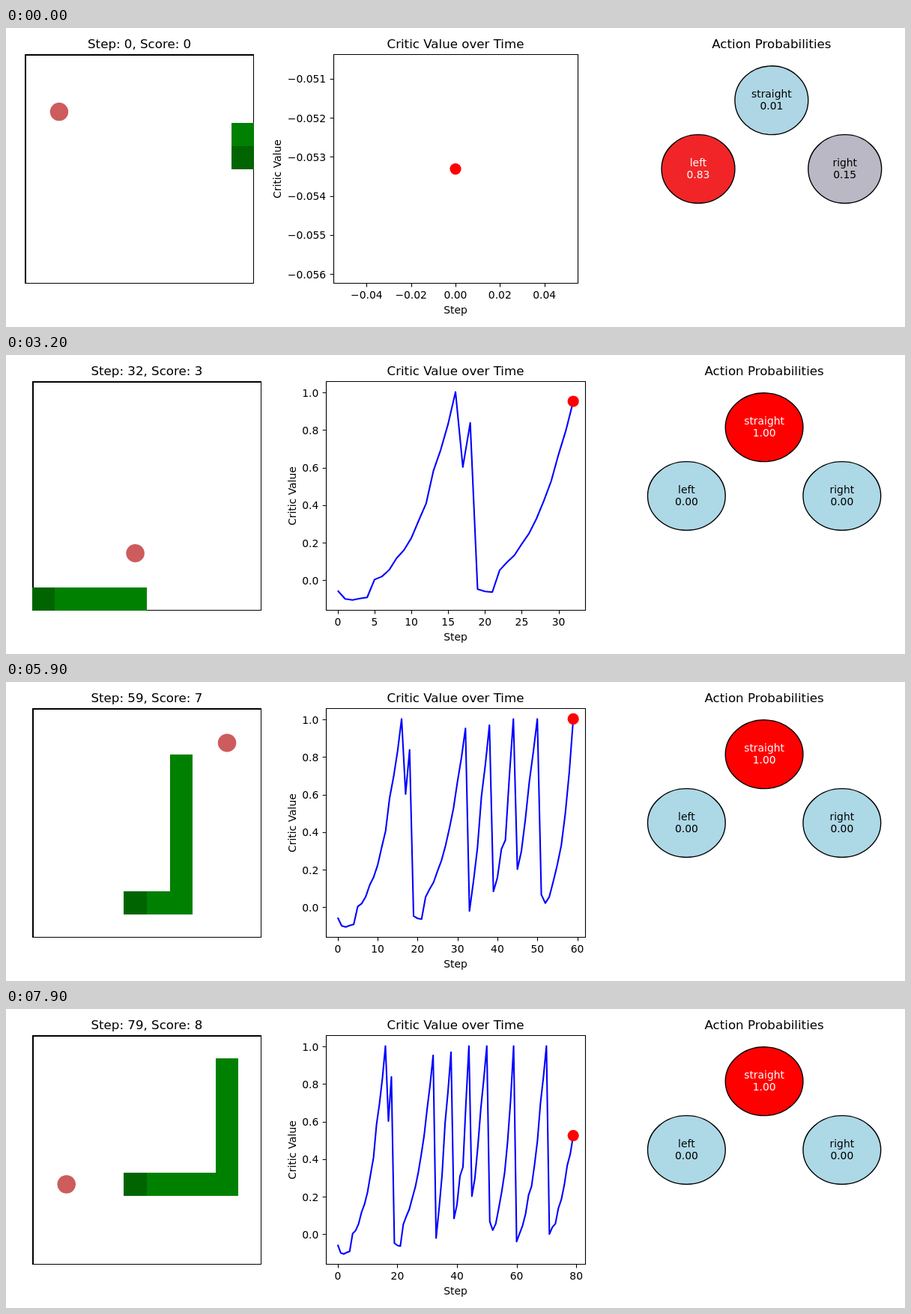
An HTML page for the animation above (8000 ms loop, 1200 px wide and 400 px high).

```html
<!DOCTYPE html>
<html lang="en">
<head>
<meta charset="utf-8">
<title>Snake agent</title>
<style>
  html, body { margin: 0; width: 100%; height: 100%; overflow: hidden; background: #fff; }
  svg { display: block; width: 1200px; height: 400px; font: 13.89px "DejaVu Sans", sans-serif; }
  .title { font-size: 16.67px; }
</style>
</head>
<body>
<svg id="stage" viewBox="0 0 1200 400"></svg>
<script>
const STEP_MS = 100, STEPS = 80, FONT = 13.89;
const TOP = 35.5, SIZE = 306.2, BOTTOM = TOP + SIZE, CELL = SIZE / 10;
const stage = document.getElementById('stage');

// Critic values in thousandths, one per step
const critic = [
  -53.3, -97, -103, -95, -89, 6, 22, 58, 120, 163, 227, 320, 410, 585, 698, 835, 1005, 605, 840, -45,
  -57, -61, 56, 98, 135, 195, 252, 330, 425, 530, 672, 800, 955, -18, 140, 318, 592, 765, 972, 86,
  160, 312, 360, 700, 1005, 205, 300, 470, 672, 830, 1005, 70, 24, 58, 140, 228, 332, 500, 720, 1005,
  -37, 6, 48, 110, 210, 257, 370, 502, 700, 840, 1005, 3, 40, 58, 140, 187, 265, 370, 430, 528
].map(v => v / 1000);

// The snake's route as runs; the first cell is its tail at step 0
const DIRS = 'URDL';
const route = [[9, 3]], heading = [];
for (const [, d, n] of 'D4 L8 U6 R3 D8 L4 U2 R4 U1 L3 U4 R5 D6 L2 U7 R4 D5 L4'.matchAll(/(\w)(\d)/g)) {
  const k = DIRS.indexOf(d);
  for (let i = 0; i < +n; i++) {
    const [x, y] = route[route.length - 1];
    route.push([x + [0, 1, 0, -1][k], y + [-1, 0, 1, 0][k]]);
    heading.push(k);
  }
}
const mealSteps = [16, 18, 32, 38, 44, 50, 59, 70];
const foods = [...mealSteps.map(s => route[s + 1]), [1, 6]];

// Probabilities as [left, straight, right]
const unsure = { 0: [.83, .01, .15], 19: [0, .95, .04] };
function policy(step) {
  if (unsure[step]) return unsure[step];
  const turn = (heading[step] - heading[step - 1] + 5) % 4;
  return [0, 1, 2].map(i => +(i === turn));
}

const text = (s, x, y, extra = '') =>
  `<text x="${x}" y="${y}" text-anchor="middle" ${extra}>${s}</text>`;
const rect = (x, y, x2, y2, fill) =>
  `<rect x="${x}" y="${y}" width="${x2 - x}" height="${y2 - y}" fill="${fill}"/>`;
const snap = v => Math.floor(v) + .5;

function ticks(lo, hi, bins) {
  const raw = (hi - lo) / bins;
  const unit = 10 ** Math.floor(Math.log10(raw));
  const gap = unit * [1, 2, 2.5, 5, 10].find(m => m * unit >= raw * (1 - 1e-9));
  let digits = 0;
  while (Math.abs(gap * 10 ** digits - Math.round(gap * 10 ** digits)) > 1e-6) digits++;
  const list = [];
  for (let k = Math.ceil(lo / gap); k * gap <= hi; k++)
    list.push({ v: k * gap, label: (k * gap).toFixed(digits).replace('-', '\u2212') });
  return list;
}

function limits(values) {
  let lo = Math.min(...values), hi = Math.max(...values);
  if (lo === hi) {
    const pad = Math.abs(lo) * .05 || .05;
    lo -= pad;
    hi += pad;
  }
  const margin = (hi - lo) * .05;
  return [lo - margin, hi + margin];
}

const labelWidth = s =>
  [...s].reduce((w, c) => w + (c === '.' ? .318 : c === '\u2212' ? .838 : .636), 0) * FONT;

function board(step, width) {
  const left = 15 + (width - SIZE) / 2;
  const px = c => Math.round(left + c * CELL), py = r => Math.round(TOP + r * CELL);
  const x0 = px(0), x1 = px(10), y0 = 35, y1 = py(10);
  const score = mealSteps.filter(s => s <= step).length;
  const [fx, fy] = foods[score];
  let out = text(`Step: ${step}, Score: ${score}`, 15 + width / 2, 27, 'class="title"')
    + rect(x0, y0, x1, y0 + 2, '#000') + rect(x0, y0, x0 + 2, y1, '#000')
    + rect(x1 - 1, y0, x1, y1, '#000') + rect(x0, y1 - 1, x1, y1, '#000')
    + `<circle cx="${left + (fx + .5) * CELL}" cy="${TOP + (fy + .5) * CELL}" r="${CELL * .4}" fill="#cd5c5c"/>`;
  for (let i = step - score; i <= step + 1; i++) {
    const [c, r] = route[i];
    out += rect(px(c), py(r), px(c + 1), py(r + 1), i > step ? '#006400' : '#008000');
  }
  return out;
}

function chart(step, width, yLim, yTicks, yLabel) {
  const left = 600 - width / 2, right = 600 + width / 2;
  const xLim = limits(step ? [0, step] : [0]);
  const bins = Math.floor(width * .72 / 30);
  const px = v => left + (v - xLim[0]) / (xLim[1] - xLim[0]) * width;
  const py = v => BOTTOM - (v - yLim[0]) / (yLim[1] - yLim[0]) * SIZE;
  const points = critic.slice(0, step + 1).map((v, i) => `${px(i).toFixed(2)},${py(v).toFixed(2)}`);
  const xl = snap(left + .5), xr = snap(right + .5), yt = 35.5, yb = snap(BOTTOM);
  let out = text('Critic Value over Time', 600, 27, 'class="title"') + text('Step', 600, 382);
  let marks = '';
  for (const { v, label } of ticks(...xLim, bins)) {
    marks += `M${snap(px(v) + .5)} ${yb}v4.9`;
    out += text(label, px(v), 362);
  }
  for (const { v, label } of yTicks) {
    marks += `M${xl} ${snap(py(v))}h-4.9`;
    out += `<text x="${left - 9.72}" y="${py(v) + 5}" text-anchor="end">${label}</text>`;
  }
  const lx = left - 9.72 - yLabel - 5.56 - 3;
  return out + text('Critic Value', 0, 0, `transform="translate(${lx} 188.6) rotate(-90)"`)
    + `<polyline points="${points.join(' ')}" fill="none" stroke="#00f" stroke-width="2.08" stroke-linejoin="round"/>`
    + `<circle cx="${px(step)}" cy="${py(critic[step])}" r="7.6" fill="#f00"/>`
    + `<path d="M${xl} ${yt}H${xr}V${yb}H${xl}Z${marks}" fill="none" stroke="#000" stroke-width="1.11"/>`;
}

function actions(step, width) {
  const mid = 1185 - width / 2;
  const probs = policy(step);
  return text('Action Probabilities', mid, 27, 'class="title"')
    + ['left', 'straight', 'right'].map((name, i) => {
      const p = probs[i];
      const cx = mid + (i - 1) * .3 * width;
      const cy = TOP + SIZE * (i === 1 ? .2 : .5);
      const mix = [[173, 255], [216, 0], [230, 0]].map(([a, b]) => Math.round(a + (b - a) * p));
      const ink = `fill="${p > .5 ? '#fff' : '#000'}"`;
      return `<ellipse cx="${cx}" cy="${cy}" rx="${width * .15}" ry="${SIZE * .15}" fill="rgb(${mix})" stroke="#000" stroke-width="1.39"/>`
        + text(name, cx, cy - 3.6, ink) + text(p.toFixed(2), cx, cy + 12.2, ink);
    }).join('');
}

function draw(step) {
  const yLim = limits(critic.slice(0, step + 1));
  const yTicks = ticks(...yLim, 9);
  const yLabel = Math.max(...yTicks.map(t => labelWidth(t.label)));
  // Wider tick labels squeeze all three panels
  const width = 345.8 - (yLabel - labelWidth('0.0')) * 2 / 3;
  stage.innerHTML = board(step, width) + chart(step, width, yLim, yTicks, yLabel) + actions(step, width);
}

const start = performance.now();
let shown = -1;
function tick() {
  const step = Math.floor((performance.now() - start) / STEP_MS) % STEPS;
  if (step !== shown) draw(shown = step);
  requestAnimationFrame(tick);
}
tick();
</script>
</body>
</html>
```
